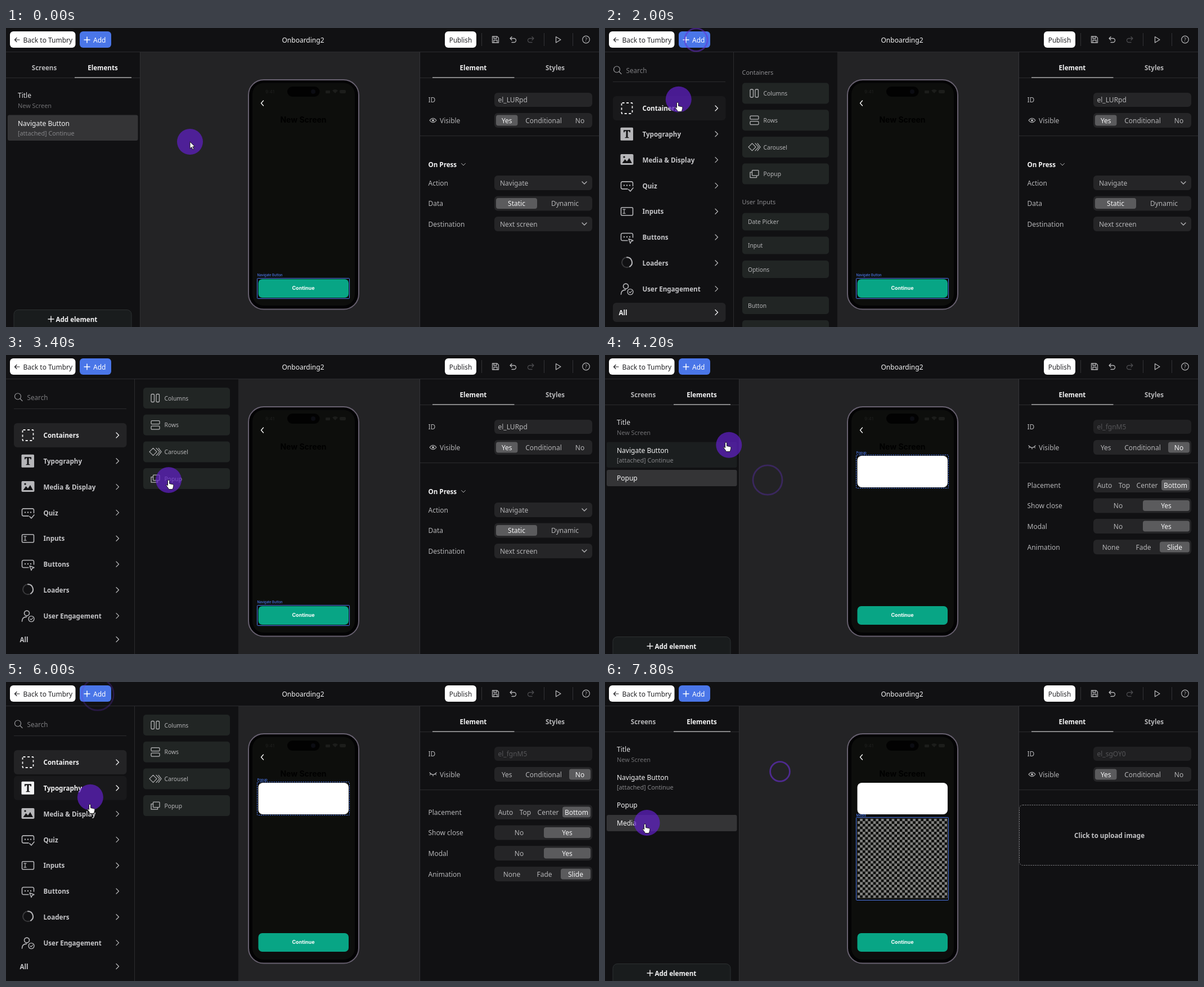
These frames come from a looping animation (1054 px wide and 531 px high, 8000 ms). An HTML page:

```html
<!DOCTYPE html>
<html lang="en">
<head>
<meta charset="utf-8">
<title>Screen builder</title>
<style>
html, body { margin: 0; width: 100%; height: 100%; overflow: hidden; background: #111113; }
svg { display: block; width: 1054px; height: 531px; }
text { font-family: "Noto Sans", "Open Sans", sans-serif; white-space: pre; }
.phone { font-family: Inter, "Noto Sans", sans-serif; }
</style>
</head>
<body>
<svg id="stage" viewBox="0 0 1054 531"></svg>
<script>
const LOOP = 8000, STEP = 200, LAG = 25;
const stage = document.getElementById('stage');
const DARK = '#111113', LINE = '#2b2b2e', FIELD = '#252527', TILE = '#212524';
const BLUE = '#4a76e8', GREY = '#b4b4b6', WHITE = '#f4f4f5';

const rect = (x, y, x2, y2, r, fill, extra = '') =>
  `<rect x="${x}" y="${y}" width="${x2 - x}" height="${y2 - y}" rx="${r}" fill="${fill}" ${extra}/>`;
const stroke = (d, color = GREY, w = 1.3, extra = '') =>
  `<path d="${d}" fill="none" stroke="${color}" stroke-width="${w}" stroke-linecap="round" stroke-linejoin="round" ${extra}/>`;
const shape = (d, fill) => `<path d="${d}" fill="${fill}"/>`;
const circle = (x, y, r, fill, extra = '') => `<circle cx="${x}" cy="${y}" r="${r}" fill="${fill}" ${extra}/>`;
const outline = (color, w = 1.3) => `stroke="${color}" stroke-width="${w}"`;
// y is the optical middle of the line
const text = (x, y, s, fill = GREY, size = 12, weight = 400, anchor = 'start', cls = '') =>
  `<text x="${x}" y="${y + size * .36}" fill="${fill}" font-size="${size}" font-weight="${weight}" text-anchor="${anchor}" class="${cls}">${s}</text>`;
const mid = (x, y, s, fill, size, weight, cls) => text(x, y, s, fill, size, weight, 'middle', cls);
const bold = (x, y, s, fill, anchor) => text(x, y, s, fill, 11.6, 600, anchor);
const at = (x, y, s) => `<g transform="translate(${x} ${y})">${s}</g>`;
const hline = (x, x2, y, color = LINE) => rect(x, y, x2, y + 1, 0, color);
const vline = (x, y, y2, color = LINE) => rect(x, y, x + 1, y2, 0, color);
const down = (x, y) => stroke(`M${x - 4} ${y - 2}l4 4 4-4`, GREY, 1.4);

// Pointer path: time, x, y
const path = [
  [0, 327, 202], [400, 327, 202], [1200, 162, 22], [1600, 162, 22], [1900, 136, 111],
  [2000, 129, 132], [2200, 126, 148], [2450, 220, 154], [2600, 243, 156], [3000, 286, 217],
  [3200, 289, 222], [3850, 289, 222], [4200, 215, 155], [4800, 167, 30], [5000, 163, 22],
  [5600, 163, 22], [6000, 149, 217], [6200, 148, 236], [6500, 150, 236], [6900, 311, 159],
  [7480, 311, 159], [7700, 85, 244], [7800, 71, 252], [8000, 71, 252]
];
// Clicks: time, x, y
const clicks = [[1550, 162, 21], [3420, 289, 222], [5100, 163, 22], [7500, 311, 159]];

function pointer(t) {
  if (t <= 0) return { x: path[0][1], y: path[0][2] };
  const i = path.findIndex(k => k[0] >= t);
  const [t0, x0, y0] = path[i - 1], [t1, x1, y1] = path[i];
  const p = (t - t0) / (t1 - t0);
  return { x: x0 + (x1 - x0) * p, y: y0 + (y1 - y0) * p };
}

function header() {
  const ink = '#222225';
  return rect(0, 0, 1054, 42, 0, DARK) + hline(0, 1054, 42) +
    rect(7, 6, 123.5, 35, 6, '#fff') + stroke('M24 21h-8.500m3.500-3.500l-3.500 3.500 3.500 3.500', ink, 1.2) +
    text(30.5, 21.5, 'Back to Tumbry', ink) +
    rect(131, 6, 187, 35, 6, BLUE) + stroke('M139 21h10m-5-5v10', '#fff', 1.5) + text(155, 21.5, 'Add', '#fff') +
    mid(528, 21.5, 'Onboarding2', WHITE) +
    rect(780, 6, 836, 35, 6, '#fff') + mid(808, 21.5, 'Publish', ink, 11.7) +
    [845, 956, 1007].map(x => vline(x, 9, 32, '#333336')).join('') +
    stroke('M864.500 15h8.500l2.500 2.500v8.500h-11zM867 15v3.500h5v-3.500M867 26v-4.500h6v4.500') +
    stroke('M899 15.500l-3 3 3 3M896 18.500h7a3.500 3.500 0 0 1 0 7h-4') +
    stroke('M935 15.500l3 3-3 3M938 18.500h-7a3.500 3.500 0 0 0 0 7h4', '#4a4a4d') +
    stroke('M977.500 15.500v10.500l8.500-5.200z') +
    circle(1031, 20.500, 6.300, 'none', outline(GREY, 1.2)) + mid(1031, 20.500, '?', GREY, 9);
}

function phone(sel) {
  const dim = '#1c1d1b', hasPopup = sel !== 'nav';
  const frame = (y, y2, extra = '') => rect(446.5, y, 610.5, y2, 1, 'none', outline(BLUE, 1) + extra);
  const label = (y, s) => text(446.5, y, s, BLUE, 5.9, 500, 'start', 'phone');
  let s = rect(431, 92, 627, 499.500, 27, '#030304', outline('#67606f', 2)) +
    rect(438, 97.500, 620, 493, 20, '#0d0e0c') +
    rect(500, 104, 557.500, 122, 9, '#020202') + circle(546, 113, 4, '#0b0c12') +
    mid(469, 113, '9:41', dim, 8, 600, 'phone') +
    rect(568, 111, 576, 116, 1, dim) + shape('M580 111q5-4 10 0l-5 5z', dim) + rect(593, 110, 604, 116, 2, dim) +
    stroke('M457.500 129l-4 4.500 4 4.500', '#fff', 1.3) +
    mid(528.500, 163, 'New Screen', '#000', 14, 700, 'phone') +
    rect(448.500, 446, 609, 479, 7, '#08a585') + mid(528.500, 462, 'Continue', '#fff', 9, 700, 'phone');
  if (sel === 'nav') s += frame(444.500, 480.500) + label(439, 'Navigate Button');
  if (hasPopup) s += rect(448.500, 179, 609, 235, 8, '#fff');
  if (sel === 'popup') s += frame(177.500, 236.500, ' stroke-dasharray="2.500 1.500"') + label(173.500, 'Popup');
  if (sel === 'media') s += rect(448.500, 242.500, 609, 384, 0, 'url(#check)') + frame(240.500, 387.500) + label(236.500, 'Media');
  return s;
}

// Options: label, left and right edge
function segments(y, options, chosen) {
  return rect(868, y - 13, 1042, y + 13, 6, FIELD) + options.map(([s, x, x2]) =>
    (s === chosen ? rect(x, y - 9.500, x2, y + 9.500, 4, '#5b5b5d') : '') +
    mid((x + x2) / 2, y + .5, s, s === chosen ? WHITE : GREY)).join('');
}
const select = (y, s) => rect(868, y - 13, 1042, y + 13, 6, FIELD) + text(878, y + .5, s) + down(1028, y);

function inspector(sel) {
  const id = { nav: 'el_LURpd', popup: 'el_fgnM5', media: 'el_sgOY0' }[sel];
  const shown = sel !== 'popup', row = (y, s) => text(750.500, y, s);
  const noYes = [['No', 871, 953], ['Yes', 956, 1039]];
  let s = rect(736, 43, 1054, 531, 0, DARK) + vline(735, 43, 531, '#353538') +
    bold(830.500, 70.5, 'Element', WHITE, 'middle') + bold(976, 70.5, 'Styles', GREY, 'middle') +
    hline(736, 1054, 88) + hline(758, 903.500, 87.500, '#eee') +
    row(128, 'ID') + rect(868, 115, 1042, 140, 6, sel === 'nav' ? FIELD : '#202022') +
    text(874.500, 128, id, sel === 'nav' ? GREY : '#545457') +
    (shown
      ? stroke('M753 164q6-7.500 12 0q-6 7.500-12 0z', GREY, 1.2) + circle(759, 164, 2, GREY)
      : stroke('M753 161q6 7 12 0M755 163l-1.500 2M759 164.500v2.500M763 163l1.500 2', GREY, 1.2)) +
    text(771, 164.500, 'Visible') +
    segments(164, [['Yes', 871, 909.500], ['Conditional', 915, 996], ['No', 1001, 1039]], shown ? 'Yes' : 'No') +
    hline(736, 1054, 191);
  if (sel === 'nav') {
    s += bold(750.500, 243, 'On Press', WHITE) + stroke('M809.500 240.500l3.500 3.500 3.500-3.500', GREY, 1) +
      row(275.5, 'Action') + select(275, 'Navigate') +
      row(312, 'Data') + segments(311.5, [['Static', 871, 944], ['Dynamic', 948, 1039]], 'Static') +
      row(349, 'Destination') + select(348, 'Next screen');
  } else if (sel === 'popup') {
    s += row(231.5, 'Placement') +
      segments(231, [['Auto', 872, 904], ['Top', 908, 938], ['Center', 942, 985], ['Bottom', 989, 1039]], 'Bottom') +
      row(268, 'Show close') + segments(267.500, noYes, 'Yes') +
      row(304.500, 'Modal') + segments(304, noYes, 'Yes') +
      row(341.500, 'Animation') +
      segments(341, [['None', 880, 918], ['Fade', 940, 974], ['Slide', 986, 1039]], 'Slide');
  } else {
    s += rect(736.5, 218.500, 1070, 325.500, 6, 'none', outline('#7c7c7f', 1) + ' stroke-dasharray="2.500 1.500"') +
      bold(896.500, 272.500, 'Click to upload image', '#c4c4c6', 'middle');
  }
  return s;
}

function elements(sel, p) {
  const rows = [['nav', 154.500, 200], ['popup', 204, 233], ['media', 236, 265]];
  let s = rect(0, 43, 238, 531, 0, DARK) + vline(238, 43, 531, '#2f2f32') +
    bold(68, 70.5, 'Screens', GREY, 'middle') + bold(172, 70.5, 'Elements', WHITE, 'middle') +
    hline(0, 238, 88) + hline(122, 223, 87.500, '#eee');
  rows.forEach(([name, y, y2], i) => {
    if (i > 0 && sel === 'nav' || i > 1 && sel === 'popup') return;
    const hover = p.x < 235 && p.y > y && p.y < y2;
    if (name === sel || hover) s += rect(3, y, 234.500, y2, 3, name === sel ? '#343436' : '#1b1e1f');
    if (i) s += text(21, (y + y2) / 2 + .5, name === 'popup' ? 'Popup' : 'Media', WHITE);
  });
  return s + text(21, 120, 'Title', '#dcdcde') + text(21, 138.500, 'New Screen', '#6e6e71', 10.9) +
    text(21, 169.500, 'Navigate Button', WHITE) + text(21, 187.500, '[attached] Continue', '#858588', 10.8) +
    rect(14, 500.500, 223, 540, 8, '#191c1d', outline('#2d3132', 1)) +
    stroke('M75 517h10m-5-5v10', WHITE, 1.4) + bold(88.5, 517.5, 'Add element', WHITE);
}

const bubble = 'M1 6h-9a2.500 2.500 0 0 1-2.500-2.500v-8a2.500 2.500 0 0 1 2.500-2.500h16a2.500 2.500 0 0 1 2.500 2.500v5';
const dots = c => [-5, 0, 5].map(x => circle(x, -.5, 1.2, c)).join('');
const menu = [
  ['Containers', c => rect(-9.500, -9.500, 9.500, 9.500, 1, 'none', outline(c, 1.8) + ' stroke-dasharray="4 3.600"')],
  ['Typography', c => rect(-11.500, -11.500, 11, 11.500, 1.5, c) + shape('M-6-7h12v4h-1.500l-.5-2h-2.500v10.500l2 .5v1h-7v-1l2-.5v-10.500h-2.500l-.5 2h-1.500z', DARK)],
  ['Media &amp; Display', c => rect(-11.500, -10, 11.500, 9, 2, c) + shape('M-8.500 6l5-7 3.500 4 4-6 5 9z', DARK) + circle(-5, -5, 1.7, DARK)],
  ['Quiz', c => stroke(bubble, c, 1.6) + dots(c) + stroke('M3 7l3 3 5-6', c, 1.6)],
  ['Inputs', c => rect(-10.500, -7, 10.500, 7, 2, 'none', outline(c, 1.6)) + stroke('M-7-3.500h4M-5-3.500v7M-7 3.500h4', c, 1.2)],
  ['Buttons', c => stroke(bubble, c, 1.6) + dots(c) + stroke('M3 3l8 3-3.500 1.500-1.500 3.500z', c, 1.4)],
  ['Loaders', c => circle(0, -1, 9, 'none', outline('#39393b', 2)) + stroke('M0-10a9 9 0 0 1 5 16.500', c, 2)],
  ['User Engagement', c => circle(-2, -4.500, 4.500, 'none', outline(c, 1.6)) + stroke('M-10.500 10q0-8 8-8', c, 1.6) +
    circle(6, 5.500, 5, 'none', outline(c, 1.4)) + stroke('M3.800 5.500l1.700 1.700 3-3.200', c, 1.2)],
  ['All']
];

function categories(t, chosen, p) {
  const hover = p.x < 215 && p.y > 119 ? Math.round((p.y - 142.5) / 45.8) : -1;
  let s = rect(0, 43, 228, 531, 0, DARK) + vline(228, 43, 531) +
    circle(21, 73.500, 5.500, 'none', outline('#98989b', 1.2)) + stroke('M25 77.500l4 4', '#98989b', 1.2) +
    text(37.5, 75.500, 'Search', '#7d7d80', 11.7) + hline(14, 214, 95);
  if ((t + 500) % 1000 < 500) s += vline(38, 67, 83, '#ddd');
  menu.forEach(([name, icon], i) => {
    const last = !icon, y = last ? 505 : 142.5 + 45.8 * i;
    const on = i === chosen, lit = on || i === hover, color = lit ? '#f2f2f3' : '#b6b6b9';
    if (lit) s += rect(14, y - (last ? 17 : 21.500), 214.500, y + (last ? 17 : 21.500), 6, on ? '#232325' : '#19191b');
    if (icon) s += at(39, y, icon(color));
    s += bold(last ? 24.5 : 66.5, y + .5, name, lit ? WHITE : '#c6c6c9') +
      stroke(`M196 ${y - 4.5}l4.500 4.500-4.500 4.500`, lit ? WHITE : GREY, 1.3);
  });
  return s;
}

const containers = [
  ['Columns', rect(-7, -7, -1.500, 7, 1.500, 'none', outline(GREY)) + rect(2, -7, 7.500, 7, 1.500, 'none', outline(GREY))],
  ['Rows', rect(-7, -7.500, 8, -1.500, 1.500, 'none', outline(GREY)) + rect(-7, 2, 8, 8, 1.500, 'none', outline(GREY))],
  ['Carousel', stroke('M-3.500-6.500l6.500 6.500-6.500 6.500-6.500-6.500zM2-6.500l6 6.500-6 6.500M6-6.500l5 6.500-5 6.500', GREY, 1.2)],
  ['Popup', rect(-3.500, -6.500, 8, 3, 1, 'none', outline(GREY)) + stroke('M-4-3h-3v9.500h11.500v-3', GREY)]
];
const tile = (y, h, s) => rect(244, y - h / 2, 398, y + h / 2, 5, TILE) + text(254, y + .5, s, GREY, 10.3);
const containerTiles = y0 => containers.map(([name, icon], i) => {
  const y = y0 + 47.700 * i;
  return rect(244, y - 18.500, 398, y + 18.500, 5, TILE) + at(265, y, icon) + text(281.5, y + .5, name, GREY, 10.3);
}).join('');

function mediaTiles(t, p) {
  const over = p.x > 244 && p.x < 398 && p.y < 203;
  const drawn = Math.min(1, ((t - 7000 + 8000) % 1600) / 830) * 100;
  return rect(244, 58, 398, 203.500, 5, over ? '#28272d' : TILE) +
    rect(262, 80, 380, 165, 3, over ? '#eeeeee' : '#d9d9db') + circle(291, 105, 7.700, '#5080fa') +
    shape('M270 157.500l28-26 12 11 22-22 38.500 37z', '#5080fa') +
    mid(320.500, 188, 'Image/Video', over ? WHITE : GREY, 10.5) +
    rect(244, 214, 398, 360, 5, TILE) + rect(262, 236, 380, 321, 3, '#d9d9db') +
    (drawn ? stroke('M289 296l22-1.500 14-19 15 8 15-21', '#4f7cf0', 3, `pathLength="100" stroke-dasharray="${drawn} 200" style="stroke-linecap:butt"`) : '') +
    mid(320.500, 344, 'Chart', GREY, 10.5) + tile(387, 31, 'Raw HTML');
}

function catalog(t, chosen, p) {
  let s = rect(229, 43, 413, 531, 0, DARK);
  if (chosen === 0) return s + containerTiles(76.5);
  if (chosen === 2) return s + mediaTiles(t, p);
  s += text(243.5, 79, 'Containers', '#8c8c8f', 10.9) + containerTiles(116) + text(243.5, 309.500, 'User Inputs', '#8c8c8f', 10.9);
  [[344, 'Date Picker'], [386, 'Input'], [428.5, 'Options'], [492.5, 'Button'], [534.5, '']]
    .forEach(([y, name]) => s += tile(y, 31, name));
  return s;
}

function cursor(p, dot, hand) {
  const edge = 'stroke="#111" stroke-width=".9" stroke-linejoin="round"';
  const d = hand
    ? 'M-1.500 1.500a1.500 1.500 0 0 1 3 0v5l6 1.300q1.500.500 1.500 2.200l-1 4-1 2.500h-6.500l-1.500-2.500-3-4q-1-2 1-1.700l1.500 1.700z'
    : 'M0 0v12.200l2.900-2.700 2 4.500 2-.9-2-4.400h3.900z';
  return circle(dot.x, dot.y, 23, '#6220c8', 'opacity=".7"') +
    at(p.x, p.y, `<path d="${d}" fill="#fff" ${edge}/>`);
}

function ripples(t) {
  return clicks.map(([start, x, y]) => {
    const age = (t - start) / 1000;
    return age < 0 || age > 1 ? '' : circle(x, y, 12 + 18 * age, 'none', outline('#6a30d0', 2.8) + ` opacity="${.8 - .6 * age}"`);
  }).join('');
}

function draw(t) {
  const p = pointer(t), dot = pointer(t - LAG);
  const sel = t < 3600 ? 'nav' : t < 7600 ? 'popup' : 'media';
  const open = t >= 1600 && t < 3600 || t >= 5200 && t < 7600;
  const chosen = t < 2200 ? 8 : t < 6400 ? 0 : 2;
  const hand = p.x < 235 || open && t < 5000;
  const cell = 4.7, cellColor = '#80807e';
  stage.innerHTML =
    `<defs><pattern id="check" width="${2 * cell}" height="${2 * cell}" patternUnits="userSpaceOnUse" x="448.500" y="242.500">
      ${rect(cell, 0, 2 * cell, cell, 0, cellColor)}${rect(0, cell, cell, 2 * cell, 0, cellColor)}</pattern></defs>` +
    rect(0, 0, 1054, 531, 0, '#232325') + phone(sel) + inspector(sel) +
    (open ? categories(t, chosen, dot) + catalog(t, chosen, dot) : elements(sel, dot)) +
    header() + ripples(t) + cursor(p, dot, hand);
}

const begin = performance.now();
let shown = -1;
function tick() {
  const t = Math.floor((performance.now() - begin) % LOOP / STEP) * STEP;
  if (t !== shown) draw(shown = t);
  requestAnimationFrame(tick);
}
tick();
</script>
</body>
</html>
```
